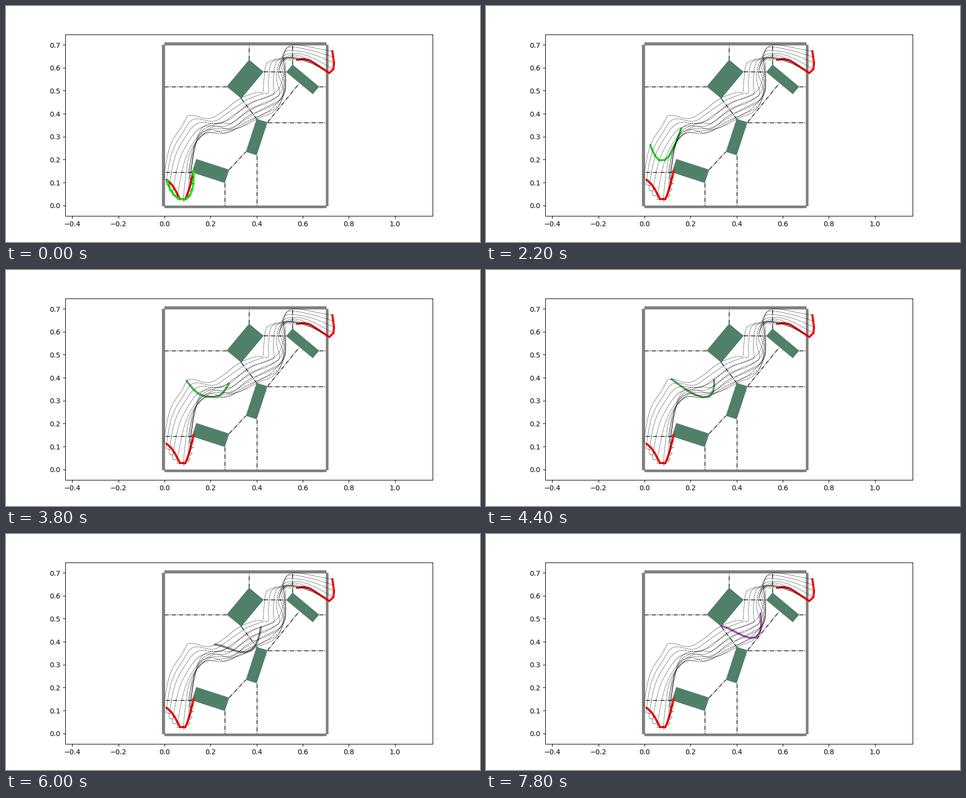
A matplotlib script for the animation above (8 s loop, 960 by 480 pixels).

```python
import numpy as np
import matplotlib.pyplot as plt
from matplotlib.animation import FuncAnimation
from matplotlib.patches import Polygon, Rectangle

NODES = 11
FRAMES = 40
END = 60            # frame at which the rope would reach its goal
SIDE = 0.7          # room size in axis units
SCALE = 466.67      # pixels per unit
ORIGIN = np.array([321.09, 405.73])


def world(points):
    """Stage pixels to axis units."""
    return (np.array(points, float) - ORIGIN) / [SCALE, -SCALE]


def resample(points):
    """Spread the rope's nodes evenly along a polyline."""
    p = np.array(points, float)
    s = np.r_[0, np.cumsum(np.hypot(*np.diff(p, axis=0).T))]
    at = np.linspace(0, s[-1], NODES)
    return np.column_stack([np.interp(at, s, axis) for axis in p.T])


def bezier(a, b, c, d):
    t = np.linspace(0, 1, 60)[:, None]
    a, b, c, d = np.array([a, b, c, d], float)
    return ((1 - t)**3 * a + 3 * t * (1 - t)**2 * b
            + 3 * t**2 * (1 - t) * c + t**3 * d)


def box(cx, cy, w, h, angle):
    """Top, right, bottom and left corner of a tilted box."""
    a = np.radians(angle)
    across = np.array([np.cos(a), np.sin(a)]) * w / 2
    down = np.array([-np.sin(a), np.cos(a)]) * h / 2
    return np.array([cx, cy]) + [-across - down, across - down,
                                 across + down, down - across]


TOP, RIGHT, BOTTOM, LEFT = range(4)
block = box(484.4, 148.8, 38.4, 71, 39.7)
plank = box(600.8, 149.2, 70.3, 20, 39.8)
post = box(507.7, 266.6, 23.2, 70.5, 18)
brick = box(414.3, 335.6, 70.2, 28.6, 18)

# Rope shapes: ends and two pulls of a Bezier curve, by frame
POSES = {
    0: [(326, 354), (337, 402), (384, 420), (380, 336)],
    7: [(321, 338), (340, 395), (383, 404), (372, 324)],
    11: [(333, 283), (345, 318), (364, 345), (395, 250)],
    15: [(356, 245), (374, 318), (410, 236), (435, 237)],
    22: [(376, 222), (395, 236), (467, 297), (462, 224)],
    26: [(405, 229), (440, 246), (491, 278), (490, 200)],
    33: [(437, 216), (470, 212), (516, 271), (533, 184)],
    39: [(476, 187), (499, 187), (568, 257), (556, 162)],
    44: [(508, 176), (545, 180), (572, 228), (566, 120)],
    49: [(521, 173), (572, 185), (566, 170), (562, 101)],
    53: [(523, 145), (560, 175), (548, 85), (580, 79)],
    57: [(536, 111), (570, 98), (600, 112), (638, 88)],
}
start = resample([(326, 354), (338, 365), (353, 394), (364, 392.5),
                  (373, 366), (380, 336)])
goal = resample([(590, 109.5), (604, 107.5), (616, 110.5), (655, 136.5),
                 (663, 129.5), (664.5, 117), (661, 92)])

keys = np.array([*POSES, END], float)
shapes = np.array([resample(bezier(*p)) for p in POSES.values()] + [goal])
speeds = np.gradient(shapes, keys, axis=0)


def rope_at(frame):
    """Smooth (Hermite) motion through the key shapes."""
    i = min(np.searchsorted(keys, frame, side="right"), len(keys) - 1) - 1
    span = keys[i + 1] - keys[i]
    u = (frame - keys[i]) / span
    ease = u * u * (3 - 2 * u)
    return ((1 - ease) * shapes[i] + ease * shapes[i + 1]
            + span * u * (1 - u) * ((1 - u) * speeds[i] - u * speeds[i + 1]))


fig, ax = plt.subplots(figsize=(9.6, 4.8), dpi=100)
ax.set_xlim(-0.4309, 1.1634)
ax.set_ylim(-0.046, 0.746)

for edge in (-0.01, SIDE):
    ax.add_patch(Rectangle((edge, 0), 0.01, SIDE, color="gray"))
    ax.add_patch(Rectangle((0, edge), SIDE, 0.01, color="gray"))
for corners in (block, plank, post, brick):
    ax.add_patch(Polygon(world(corners), fc="#508068", lw=0))


def passage(a, b):
    ax.plot(*np.transpose([a, b]), "k-.", lw=1)


def to_wall(obstacle, corner, side):
    """Dash-dot line from a corner straight to one wall."""
    x, y = world(obstacle[corner])
    ends = {TOP: (x, SIDE), RIGHT: (SIDE, y), BOTTOM: (x, 0), LEFT: (0, y)}
    passage((x, y), ends[side])


for obstacle, sides in [(block, (TOP, LEFT)), (plank, (TOP, RIGHT)),
                        (post, (RIGHT, BOTTOM)), (brick, (LEFT, BOTTOM))]:
    for side in sides:
        to_wall(obstacle, side, side)
for a, b in [(block[RIGHT], plank[LEFT]), (block[BOTTOM], post[TOP]),
             (post[RIGHT], (plank[LEFT] + plank[BOTTOM]) / 2),
             (brick[RIGHT], post[LEFT])]:
    passage(*world([a, b]))

# Each node leaves a dashed trace of its whole trip
trip = np.array([start] + [rope_at(f) for f in range(END + 1)])
for node in range(NODES):
    ax.plot(*world(trip[:, node]).T, "k--", lw=0.5, zorder=2.6)
for shape in (start, goal):
    ax.plot(*world(shape).T, color="red", lw=3, zorder=2.3)
rope, = ax.plot([], [], lw=3, zorder=2.5)


def update(frame):
    fade = frame / END
    rope.set_data(*world(rope_at(frame)).T)
    rope.set_color((fade, 1 - fade, fade))
    return rope,


anim = FuncAnimation(fig, update, frames=FRAMES, interval=200,
                     repeat=True, repeat_delay=0)
plt.show()
```
